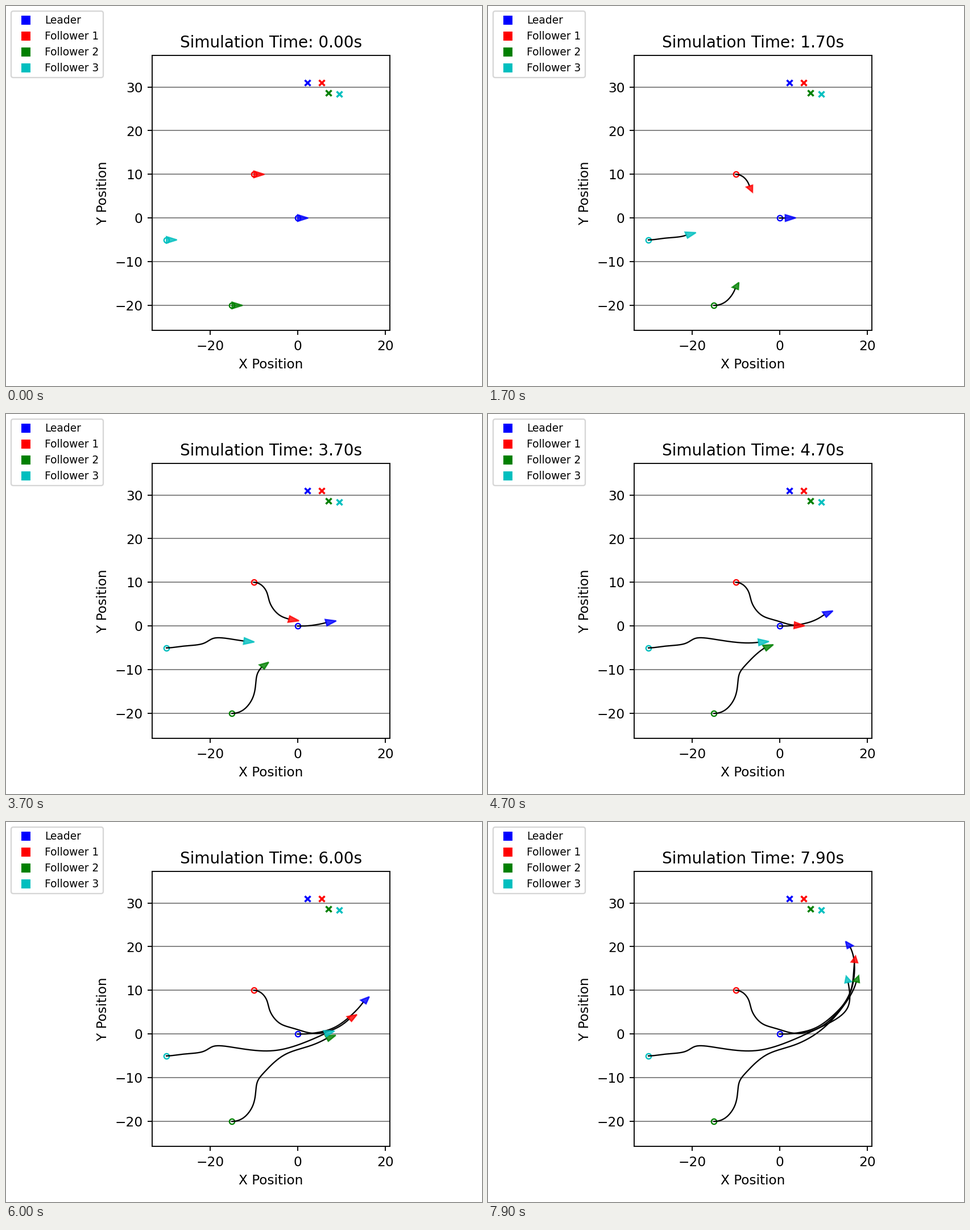
Write a matplotlib script that moves like this. It is 837 px wide and 669 px high and loops after 8 s.

```python
import numpy as np
import matplotlib.pyplot as plt
from matplotlib.animation import FuncAnimation
from matplotlib.lines import Line2D
from matplotlib.patches import Polygon

W, H, DPI = 837, 669, 167.4
FRAMES, STEP_MS, SUB = 80, 100, 5
SPAN = 8.8                          # seconds covered by the key points
SCALE = 7.69                        # pixels per data unit
LEFT, RIGHT, TOP, BOTTOM = 256.8, 674.8, 86.8, 571.3
X0, Y0 = 512.8, 373.3               # pixel position of the data origin
NOSE_X, NOSE_Y, HALF_BASE = 2.4, 1.45, 0.75

# Key positions, evenly spaced in time
LEADER = [(0, 0), (0.55, 0), (2.25, 0.05), (5.2, 0.47), (9.05, 1.85),
          (13.35, 5.35), (16.5, 10.5), (16.65, 18.6), (12.3, 24.7)]
FOLLOWER_1 = [(-10, 10), (-8.3, 9.4), (-7, 7.6), (-6.2, 5), (-4, 2.4),
              (-0.6, 1.2), (4, 0.15), (9.5, 1.7), (13.75, 5.6),
              (16.5, 10.8), (17.2, 17.2), (19, 23)]
FOLLOWER_2 = [(-15, -20), (-12.35, -19.15), (-10.3, -16.5), (-9.6, -13.4),
              (-9.15, -10.8), (-7.2, -8.3), (-2.8, -4.65), (3.4, -2.5),
              (9.7, 1.1), (14.75, 6.65), (17.65, 12.7), (16.6, 18.6)]
FOLLOWER_3 = [(-30, -5), (-26.1, -4.6), (-21.75, -4.05), (-19.2, -2.8),
              (-15.4, -2.95), (-10.2, -3.7), (-4, -3.6), (2.9, -1.4),
              (9.65, 1.7), (15.5, 5.95), (15.5, 12.7), (14.5, 19)]


def trajectory(keys):
    """Positions and headings on a cubic spline that starts off level."""
    p = np.array(keys, float)
    n = len(p)
    system = 4 * np.eye(n) + np.eye(n, k=1) + np.eye(n, k=-1)
    system[0, :2] = 1, 0
    system[-1, -1] = 2
    rhs = np.empty_like(p)
    rhs[0] = p[1, 0] - p[0, 0], 0
    rhs[1:-1] = 3 * (p[2:] - p[:-2])
    rhs[-1] = 3 * (p[-1] - p[-2])
    slope = np.linalg.solve(system, rhs)

    t = np.arange((FRAMES - 1) * SUB + 1) * STEP_MS / 1000 / SUB
    u = t * (n - 1) / SPAN
    i = u.astype(int)
    u = (u - i)[:, None]
    step = p[i + 1] - p[i]
    c2 = 3 * step - 2 * slope[i] - slope[i + 1]
    c3 = slope[i] + slope[i + 1] - 2 * step
    pos = p[i] + u * (slope[i] + u * (c2 + u * c3))
    vel = slope[i] + u * (2 * c2 + 3 * u * c3)
    return pos, np.arctan2(vel[:, 1], vel[:, 0])


def arrow_points(pos, heading):
    c, s = np.cos(heading), np.sin(heading)
    side = HALF_BASE * np.array([-s, c])
    return [pos + (NOSE_X * c, NOSE_Y * s), pos + side, pos - side]


class Agent:
    def __init__(self, ax, color, keys, goal):
        self.pos, self.heading = trajectory(keys)
        ax.plot(*self.pos[0], "o", color=color, mfc="none", ms=4, mew=1)
        ax.plot(*goal, "x", color=color, ms=4, mew=1.5)
        self.trail, = ax.plot([], [], color="black", lw=1)
        self.arrow = Polygon(arrow_points(self.pos[0], 0), fc=color, ec=color,
                             lw=1, alpha=0.8, zorder=3)
        ax.add_patch(self.arrow)

    def move(self, k):
        self.trail.set_data(*self.pos[:k + 1].T)
        self.arrow.set_xy(arrow_points(self.pos[k], self.heading[k]))


plt.rcParams["font.family"] = "DejaVu Sans"
fig = plt.figure(figsize=((W + 0.01) / DPI, (H + 0.01) / DPI), dpi=DPI,
                 facecolor="white")
ax = fig.add_axes([LEFT / W, 1 - BOTTOM / H,
                   (RIGHT - LEFT) / W, (BOTTOM - TOP) / H])
ax.set_xlim((LEFT - X0) / SCALE, (RIGHT - X0) / SCALE)
ax.set_ylim((Y0 - BOTTOM) / SCALE, (Y0 - TOP) / SCALE)
ax.set_autoscale_on(False)
ax.set_xticks([-20, 0, 20])
ax.set_yticks(range(-20, 31, 10))
ax.grid(axis="y", color="gray", lw=0.8)
ax.set_xlabel("X Position")
ax.set_ylabel("Y Position")
title = ax.set_title("")

SPECS = {
    "Leader": ("b", LEADER, (2.2, 31.0)),
    "Follower 1": ("r", FOLLOWER_1, (5.53, 31.0)),
    "Follower 2": ("g", FOLLOWER_2, (7.06, 28.68)),
    "Follower 3": ("c", FOLLOWER_3, (9.53, 28.4)),
}
agents = [Agent(ax, *spec) for spec in SPECS.values()]
handles = [Line2D([], [], ls="none", marker="s", color=spec[0], ms=6.7, mew=0)
           for spec in SPECS.values()]
fig.legend(handles, list(SPECS), loc="upper left", fontsize=8,
           borderpad=0.375, labelspacing=0.48)


def update(frame):
    title.set_text(f"Simulation Time: {frame * STEP_MS / 1000:.2f}s")
    for agent in agents:
        agent.move(frame * SUB)
    return []


anim = FuncAnimation(fig, update, frames=FRAMES, interval=STEP_MS,
                     repeat=True, repeat_delay=0, blit=False)
plt.show()
```
